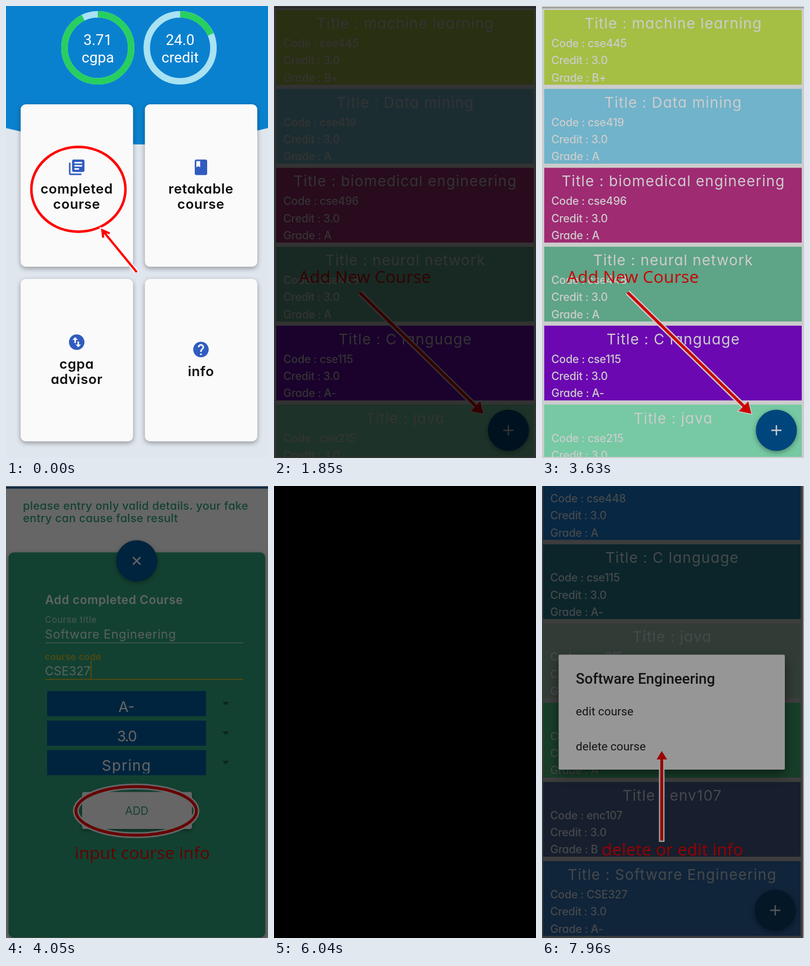
Animation of 465 by 800 pixels, one loop 8 s. Source, as an HTML page:

```html
<!DOCTYPE html>
<html lang="en">
<head>
<meta charset="utf-8">
<title>Course manager guide</title>
<style>
html, body { margin: 0; width: 100%; height: 100%; overflow: hidden; background: #000; }
svg { display: block; width: 465px; height: 800px; }
text { font-family: Inter, sans-serif; font-feature-settings: "cv11"; white-space: pre; }
.mid { text-anchor: middle; }
.ring { font: 26.2px Roboto, sans-serif; fill: #fff; }
.card { font-size: 24px; font-weight: 600; letter-spacing: .6px; fill: #0b0b0b; }
.title { font-size: 26px; font-weight: 400; letter-spacing: 1.1px; }
.line { font-size: 19.5px; font-weight: 500; letter-spacing: -.2px; }
.note { font: 30px "Open Sans", sans-serif; letter-spacing: .15px; fill: #f00; }
.warn { font-size: 20px; font-weight: 500; letter-spacing: .3px; fill: #2ea37c; }
.head { font-size: 21px; font-weight: 600; letter-spacing: .6px; fill: #f4fbf8; }
.label { font-size: 16px; letter-spacing: .45px; fill: #b9e0d3; }
.field { font-size: 21.5px; letter-spacing: .7px; fill: #e4f4ee; }
.pick { font-size: 26px; letter-spacing: 1.3px; fill: #fff; }
.add { font-size: 19.5px; fill: #2ea37c; }
.dlg { font: 20.7px Roboto, sans-serif; fill: #222; }
.dlgHead { font: 500 25.8px Roboto, sans-serif; fill: #202020; }
.lift { filter: drop-shadow(0 3px 4px rgba(0, 0, 0, .35)); }
.deep { filter: drop-shadow(0 8px 10px rgba(0, 0, 0, .5)); }
</style>
</head>
<body>
<svg id="stage" viewBox="0 0 465 800"></svg>
<script>
const RED = '#f00', BLUE = '#00589c', GREEN = '#2ea37c', ICON = '#305cc0';

const rect = (x, y, w, h, fill, r = 0, cls = '') =>
  `<rect x="${x}" y="${y}" width="${w}" height="${h}" rx="${r}" fill="${fill}" class="${cls}"/>`;
const text = (x, y, cls, s, extra = '') => `<text x="${x}" y="${y}" class="${cls}" ${extra}>${s}</text>`;
const stroke = (d, color, w) => `<path d="${d}" fill="none" stroke="${color}" stroke-width="${w}"/>`;
const fill = (d, color) => `<path d="${d}" fill="${color}"/>`;
const icon = (x, y, d) =>
  `<path transform="translate(${x} ${y}) scale(1.375) translate(-12 -12)" d="${d}" fill="${ICON}"/>`;
const oval = (x, y, rx, ry, color, w) =>
  `<ellipse cx="${x}" cy="${y}" rx="${rx}" ry="${ry}" fill="none" stroke="${color}" stroke-width="${w}"/>`;

function fab(x, y, color, mark, turn = 0, arm = 9) {
  return `<circle cx="${x}" cy="${y}" r="36.5" fill="${color}" class="lift"/>
    <path transform="translate(${x} ${y}) rotate(${turn})" d="M${-arm} 0H${arm}M0 ${-arm}V${arm}"
      stroke="${mark}" stroke-width="2.4"/>`;
}

// White-edged arrow: a shaft and a solid head
function arrow(shaft, head) {
  return stroke(shaft, '#fff', 9.5) +
    `<path d="${head}" fill="#fff" stroke="#fff" stroke-width="3"/>` +
    stroke(shaft, RED, 5) + fill(head, RED);
}

function ring(x, share, top, bottom) {
  const dial = (len, color) => `<circle cx="${x}" cy="74" r="59.2" fill="none" stroke="${color}"
    stroke-width="11.6" pathLength="1" stroke-dasharray="${len} 2" transform="rotate(-90 ${x} 74)"/>`;
  return dial(1, '#a8e2f3') + dial(share, '#27cf60') +
    text(x, 69, 'ring mid', top) + text(x, 100, 'ring mid', bottom);
}

function card(x, y, iconY, d, lines) {
  const cx = x + 99.5;
  return rect(x, y, 199.5, 287.5, '#fafafa', 9, 'lift') + icon(cx, iconY, d) +
    lines.map((s, i) => text(cx, iconY + 46.5 + i * 27, 'card mid', s)).join('');
}

function course(x, y, color, ink, [title, code, grade]) {
  const lines = [`Code : ${code}`, 'Credit : 3.0', `Grade : ${grade}`];
  return rect(x, y, 457, 132.3, color) + `<g fill="${ink}">` +
    (title && text(x + 229, y + 33, 'title mid', `Title : ${title}`)) +
    lines.map((s, i) => text(x + 12.5, y + 66 + i * 30.3, 'line', s)).join('') + '</g>';
}

const disc = 'M12 2C6.48 2 2 6.48 2 12s4.48 10 10 10 10-4.48 10-10S17.52 2 12 2z';
const icons = {
  pages: 'M4 6H2v14c0 1.1.9 2 2 2h14v-2H4V6zm16-4H8c-1.1 0-2 .9-2 2v12c0 1.1.9 2 2 2h12c1.1 0 2-.9 2-2V4c0-1.1-.9-2-2-2zm-1 9H9V9h10v2zm-4 4H9v-2h6v2zm4-8H9V5h10v2z',
  book: 'M18 2H6c-1.1 0-2 .9-2 2v16c0 1.1.9 2 2 2h12c1.1 0 2-.9 2-2V4c0-1.1-.9-2-2-2zM6 4h5v8l-2.5-1.5L6 12V4z',
  swap: disc + 'M6.5 9L10 5.5 13.5 9H11v4H9V9H6.5zm11 6L14 18.5 10.5 15H13v-4h2v4h2.5z',
  help: disc + 'm1 17h-2v-2h2v2zm2.07-7.75l-.9.92C13.45 12.9 13 13.5 13 15h-2v-.5c0-1.1.45-2.1 1.17-2.83l1.24-1.26c.37-.36.59-.86.59-1.41 0-1.1-.9-2-2-2s-2 .9-2 2H8c0-2.21 1.79-4 4-4s4 1.79 4 4c0 .88-.36 1.68-.93 2.25z'
};

function home() {
  const pointer = 'M232 471L172 398M172.500 410L171 397L184 402.500';
  return rect(0, 0, 465, 800, '#e0e6ee') +
    fill('M0 0H465V216Q232 274 0 216Z', '#0a81cf') +
    ring(163, .9275, '3.71', 'cgpa') + ring(309, .1846, '24.0', 'credit') +
    card(26, 174, 285.5, icons.pages, ['completed', 'course']) +
    card(246.5, 174, 285.5, icons.book, ['retakable', 'course']) +
    card(26, 483, 595, icons.swap, ['cgpa', 'advisor']) +
    card(246.5, 483, 608, icons.help, ['info']) +
    oval(128.5, 324.5, 83.5, 75, RED, 4.5) +
    stroke(pointer, '#fff', 8) + stroke(pointer, RED, 4);
}

function list() {
  const rows = [
    ['#cdee55', 'machine learning', 'cse445', 'B+'],
    ['#8ce0fc', 'Data mining', 'cse419', 'A'],
    ['#c73690', 'biomedical engineering', 'cse496', 'A'],
    ['#75cda9', 'neural network', 'cse448', 'A'],
    ['#850ade', 'C language', 'cse115', 'A-'],
    ['#93fbcb', 'java', 'cse215', 'A']
  ];
  return rect(0, 0, 465, 800, '#fff') + rect(0, 2.5, 465, 1, '#777') +
    rows.map(([c, ...info], i) => course(4, 7 + i * 139.7, c, '#fff', info)).join('') +
    rect(0, 798, 465, 2, '#fff') +
    fab(416, 751, BLUE, '#fff') +
    arrow('M152 507L362 712', 'M371.500 721.500L349 717L366 700Z') +
    text(44, 490, 'note', 'Add New Course');
}

function form() {
  const picks = [['A-', 0], ['3.0', -1.5], ['Spring', 1.3]];
  return rect(0, 0, 465, 800, '#fff') + rect(0, 1.5, 465, 3, BLUE) +
    text(30, 42, 'warn', 'please entry only valid details. your fake') +
    text(30, 64, 'warn', 'entry can cause false result') +
    rect(4.5, 117.5, 455.5, 681.5, GREEN, 9, 'lift') +
    fab(232, 132.5, BLUE, '#fff', 45, 9.5) +
    text(69.5, 209, 'head', 'Add completed Course') +
    text(69, 242, 'label', 'Course title') +
    text(69, 270, 'field', 'Software Engineering') +
    rect(70, 277, 351, 1, '#d8eee6') +
    text(69, 308, 'label', 'course code', 'style="fill:#dcb81c;font-weight:500"') +
    text(69, 335, 'field', 'CSE327', 'style="letter-spacing:0"') +
    rect(150, 309, 2, 33, '#dcb81c') + rect(70, 341.5, 351, 1.8, '#dcb81c') +
    picks.map(([s, gap], i) => {
      const y = 363 + i * 52.2;
      return rect(73, y, 282, 44.5, '#005b9c') +
        text(214, y + 37, 'pick mid', s, `style="letter-spacing:${gap}px"`) +
        rect(73, y + 41, 282, 3.5, '#005b9c') + rect(73, y + 44.5, 282, 5, GREEN) +
        fill(`M384 ${y + 19}h12l-6 6.500z`, '#1a5c45');
    }).join('') +
    rect(135, 541.5, 195, 65.5, '#fff', 4, 'lift') +
    text(232, 582, 'add mid', 'ADD') +
    oval(231, 575, 107, 43, '#fff', 10.5) + oval(231, 575, 107, 43, RED, 5) +
    text(122, 660, 'note', 'input course info');
}

function dialog() {
  const rows = [
    ['#0c4170', '', 'cse448', 'A'],
    ['#123e46', 'C language', 'cse115', 'A-'],
    ['#53645a', 'java', 'cse215', 'A'],
    ['#276743', '', 'eng105', 'A'],
    ['#27324a', 'env107', 'enc107', 'B'],
    ['#1a3c60', 'Software Engineering', 'CSE327', 'A-']
  ];
  return rect(0, 0, 465, 800, '#666') + rect(463, 0, 2, 800, '#f4f4f4') +
    rows.map(([c, ...info], i) => course(2, -37 + i * 140.2, c, '#74797d', info)).join('') +
    fab(414, 751, '#07263f', '#8a9095') +
    rect(29.5, 298.5, 401.5, 203.5, '#fafafa', 2, 'deep') +
    text(60, 349.5, 'dlgHead', 'Software Engineering') +
    text(60, 406, 'dlg', 'edit course') +
    text(60, 468, 'dlg', 'delete course') +
    stroke('M212.500 630V480', '#fff', 10) + stroke('M212.500 627.500V480', RED, 5) +
    fill('M212.500 469L222 484H203.500Z', RED) +
    text(106, 654, 'note', 'delete or edit info');
}

const stage = document.getElementById('stage');
stage.innerHTML = [home, list, form, dialog].map(draw => `<g>${draw()}</g>`).join('') +
  rect(0, 0, 465, 800, '#000');
const scenes = [...stage.children], shade = scenes.pop();

// Each fade dips to black in five steps and returns in five
const LOOP = 8000, STEP = 70, FADES = [1500, 3630, 5760, 7890];

function show(t) {
  let scene = 0, light = 1;
  FADES.forEach((start, i) => {
    const k = Math.floor((t - start) / STEP);
    if (k < 0) return;
    scene = k < 5 ? i : i + 1;
    light = k < 5 ? .8 - .2 * k : Math.min(1, .2 * (k - 4));
  });
  scenes.forEach((g, i) => g.style.display = i === scene ? '' : 'none');
  shade.setAttribute('opacity', (1 - light).toFixed(2));
}

const begin = performance.now();
function tick() {
  show((performance.now() - begin) % LOOP);
  requestAnimationFrame(tick);
}
tick();
</script>
</body>
</html>
```
